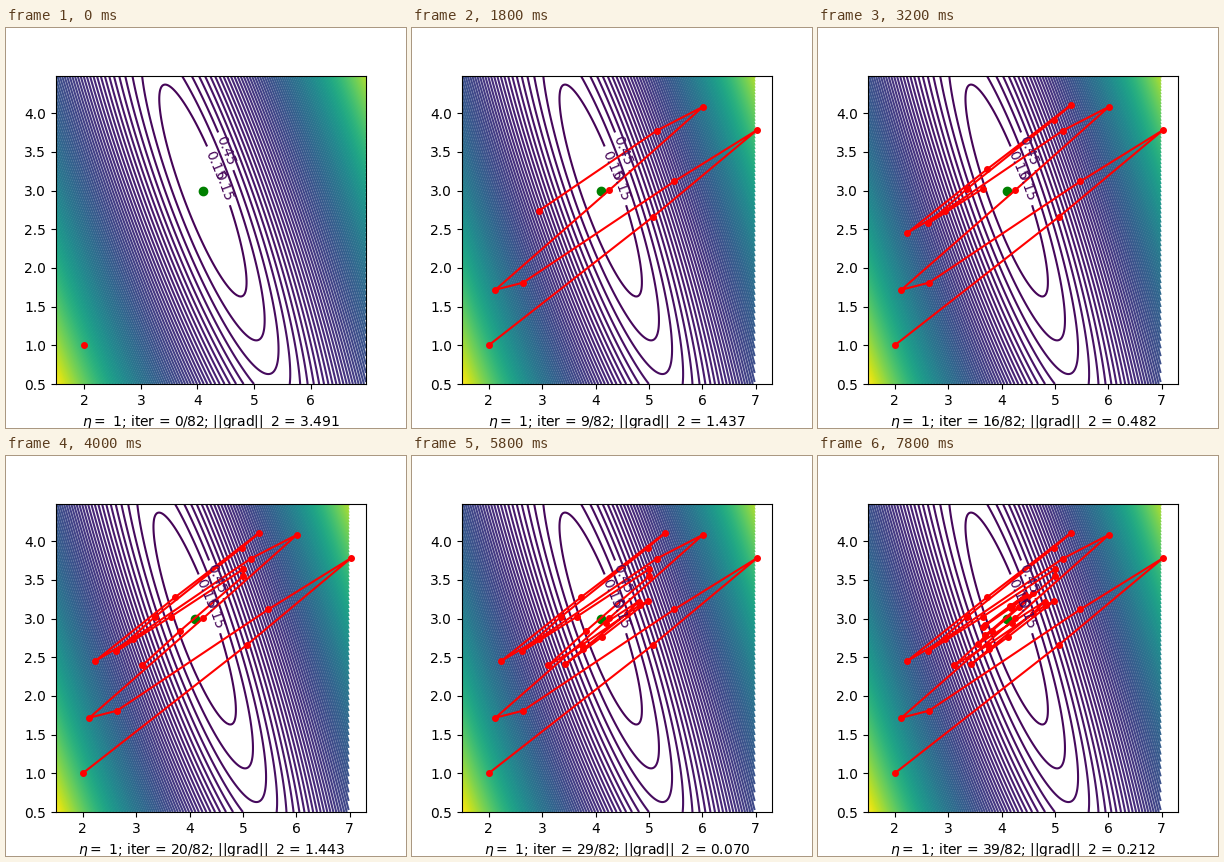
A matplotlib script that plays this animation: 400x400 px, repeating every 8 s.

```python
import numpy as np
import matplotlib.pyplot as plt
from matplotlib.animation import FuncAnimation

STEPS, TOTAL = 40, 82
ETA, BETA = 1, 0.9
H = np.array([[1.0, 0.4876], [0.4876, 0.31775]])
BEST = np.array([4.097, 3.0])


def descend(start, steps):
    """Gradient descent with momentum; returns points and gradient norms."""
    pos, vel = np.array(start, float), np.zeros(2)
    path, norms = [], []
    for _ in range(steps):
        grad = H @ (pos - BEST)
        path.append(pos)
        norms.append(np.linalg.norm(grad))
        vel = BETA * vel - ETA * grad
        pos = pos + vel
    return np.array(path), norms


path, norms = descend((2, 1), STEPS)

fig, ax = plt.subplots(figsize=(4, 4), dpi=100)

# Loss surface
xs = np.arange(1.5, 6.99, 0.02)
ys = np.arange(0.5, 4.49, 0.02)
X, Y = np.meshgrid(xs, ys)
dx, dy = X - BEST[0], Y - BEST[1]
loss = H[0, 0] * dx**2 + 2 * H[0, 1] * dx * dy + H[1, 1] * dy**2
cs = ax.contour(X, Y, loss, levels=np.arange(1, 101) * 0.15,
                cmap="viridis", vmin=0, vmax=15)
ax.set_xlim(xs[0], xs[-1])
ax.set_ylim(ys[0], ys[-1])
ax.clabel(cs, fmt="%.2f", fontsize=10,
          manual=[(4.46, 3.06), (4.32, 3.33), (4.51, 3.51)])

ax.plot(*BEST, "o", color="green")
trail, = ax.plot([], [], "ro-", ms=4, lw=1.5)


def update(i):
    pts = path[:i + 1]
    trail.set_data(pts[:, 0], pts[:, 1])
    right = pts[:, 0].max()
    if right > xs[-1]:
        right += 0.05 * (right - xs[0])
    else:
        right = xs[-1]
    ax.set_xlim(xs[0], right)
    ax.set_ylim(ys[0], ys[-1])
    ax.set_xlabel(rf"$\eta = $ {ETA}; iter = {i}/{TOTAL}; "
                  f"||grad||_2 = {norms[i]:.3f}")
    return trail,


anim = FuncAnimation(fig, update, frames=STEPS, interval=200, repeat=True,
                     repeat_delay=0, blit=False)
plt.show()
```
